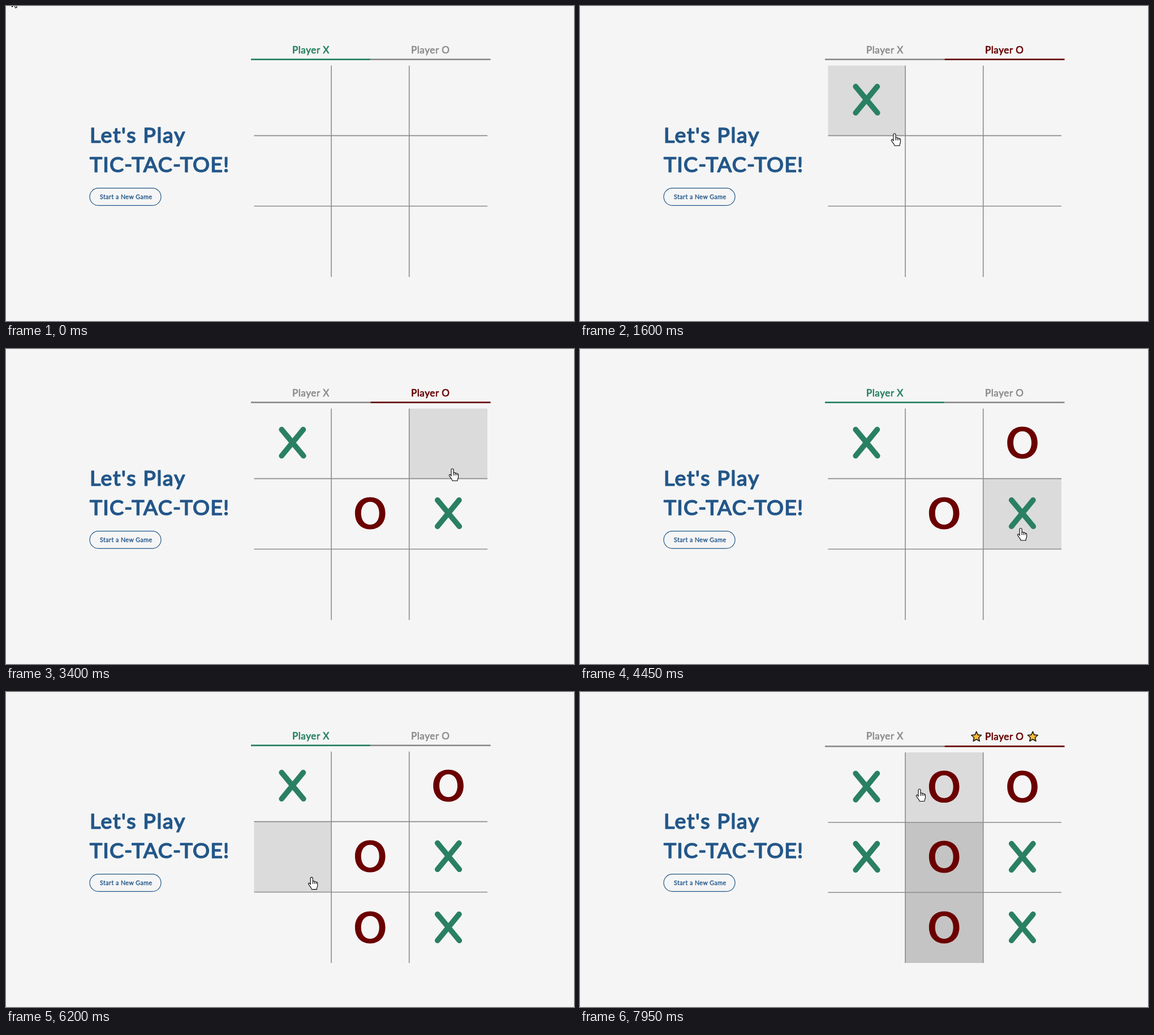
An HTML page for the animation above (8000 ms loop, 1004 by 558 pixels).

```html
<!DOCTYPE html>
<html lang="en">
<head>
<meta charset="utf-8">
<title>Tic-Tac-Toe</title>
<style>
  html, body { margin: 0; width: 100%; height: 100%; overflow: hidden; background: #f5f5f5; }
  svg { display: block; width: 100vw; height: 100vh; }
  /* a rounded stroke softens the letter ends */
  text {
    font-family: Lato, "Open Sans", sans-serif;
    stroke-linejoin: round;
    fill: currentColor;
    stroke: currentColor;
  }
  .blue { color: #235789; }
  .title { font-size: 37.5px; stroke-width: 1.7px; }
  .label { font-size: 10.6px; stroke-width: .4px; letter-spacing: .5px; }
  .player { font-size: 17px; stroke-width: .7px; letter-spacing: .6px; }
  .grid { stroke: #8c8c8c; stroke-width: 1.6; fill: none; }
  .x { stroke: #2a8062; stroke-width: 9.6; stroke-linecap: round; fill: none; }
  .o { fill: #6b0000; fill-rule: evenodd; }
  .star { fill: #fdbb35; stroke: #1c1a17; stroke-width: 1.6; stroke-linejoin: round; }
  .cursor { fill: #fff; stroke: #000; stroke-width: 1.1; stroke-linejoin: round; }
</style>
</head>
<body>
<svg viewBox="0 0 1004 558">
  <rect width="1004" height="558" fill="#f5f5f5"/>
  <g class="blue">
    <text class="title" x="148" y="242" letter-spacing="1.7">Let's Play</text>
    <text class="title" x="148" y="293.7" letter-spacing="1.2">TIC-TAC-TOE!</text>
    <rect x="148" y="322.7" width="126" height="30.6" rx="15.3" fill="none" stroke="currentColor" stroke-width="1.2"/>
    <text class="label" x="166" y="341.6">Start a New Game</text>
  </g>
  <g id="tabX"><text class="player" x="506" y="83.7">Player X</text></g>
  <g id="tabO"><text class="player" x="716" y="83.7">Player O</text></g>
  <g id="stars"></g>
  <g id="cells"></g>
  <path id="grid" class="grid"/>
  <g id="marks"></g>
  <g id="pointer">
    <path id="arrow" class="cursor" d="M0 0V16.5L3.8 13 6.3 18.6 8.8 17.5 6.4 12H11.5Z"/>
    <path id="hand" class="cursor" d="M-2 13V2A2 2 0 0 1 2 2V7.5C2.5 6.3 5 6.5 5 8.2C5.6 7.2 7.8 7.5 8 9.2C8.6 8.4 10.5 8.8 10.5 10.5V15C10.5 17 9 18 9 21.5H0C0 18.5 -3 17 -5.5 12.5C-6.5 10.5 -4.3 9.5 -3.2 11L-2 13ZM2 7.5V12M5 8.2V12M8 9.2V12"/>
  </g>
</svg>
<script>
const LOOP = 8000, STEP = 50, WIN = 7400;
const COLS = [438.5, 575, 712.7, 851];
const ROWS = [105.5, 229.6, 354.5, 480], WON_ROWS = [107, 231, 355, 480];
const MARK_X = [506.5, 643.7, 782];
const MARK_Y = [166, 291, 417], WON_MARK_Y = [167.7, 292, 417];
const WIN_CELLS = [1, 4, 7];
const GREY = '#8c8c8c', GREEN = '#26805f', RED = '#650000';

// time of each click and the cell it fills; X starts
const MOVES = [[1350, 0], [2250, 4], [3150, 5], [4050, 2], [4900, 8], [5700, 7], [6550, 3], [WIN, 1]];

// pointer: time, x, y
const PATH = [
  [0, 10.5, -15], [200, 10.5, -15], [1050, 474, 140], [1200, 493, 170], [1300, 493, 170],
  [1600, 556, 226], [2150, 659, 288], [2350, 659, 288], [2900, 770, 285], [3100, 770, 285],
  [3400, 789, 212], [3900, 785, 168], [4000, 785, 168], [4800, 775, 420], [5000, 775, 420],
  [5400, 658, 429], [5500, 650, 430], [5850, 650, 430], [6350, 510, 300], [6500, 510, 300],
  [6750, 573, 225], [7150, 650, 171], [7850, 650, 171], [7950, 600, 172], [8000, 600, 172]
];

const $ = id => document.getElementById(id);

function add(parent, tag, attrs) {
  const el = document.createElementNS('http://www.w3.org/2000/svg', tag);
  for (const k in attrs) el.setAttribute(k, attrs[k]);
  return parent.appendChild(el);
}

// squarish ellipse, k sets how full the corners are
function oval(rx, ry, k) {
  const a = rx * k, b = ry * k;
  return `M0 ${-ry}C${a} ${-ry} ${rx} ${-b} ${rx} 0S${a} ${ry} 0 ${ry}S${-rx} ${b} ${-rx} 0S${-a} ${-ry} 0 ${-ry}Z`;
}

const X_SHAPE = 'M-19.3 -23.4L19.3 23.2M18.9 -23.4L-19.3 23.2';
const O_SHAPE = oval(26.8, 28.4, .6) + oval(16, 20.2, .6);

function starPoints(cx, cy) {
  return Array.from({ length: 10 }, (_, i) => {
    const r = i % 2 ? 4.3 : 9.4, a = i * Math.PI / 5 - Math.PI / 2;
    return `${cx + r * Math.cos(a)},${cy + r * Math.sin(a)}`;
  }).join(' ');
}

const cells = Array.from({ length: 9 }, () => add($('cells'), 'rect', {}));
const marks = MOVES.map((_, i) => add($('marks'), 'path',
  i % 2 ? { class: 'o', d: O_SHAPE } : { class: 'x', d: X_SHAPE }));
const lineX = add($('tabX'), 'rect', { x: 433, width: 211.5, height: 2.7, fill: 'currentColor' });
const lineO = add($('tabO'), 'rect', { x: 644.5, width: 212, height: 2.7, fill: 'currentColor' });
for (const x of [700.7, 800.3]) add($('stars'), 'polygon', { class: 'star', points: starPoints(x, 79.4) });

function slope(i, axis) {
  const a = PATH[i - 1], p = PATH[i], b = PATH[i + 1];
  const still = (u, v) => u[1] === v[1] && u[2] === v[2];
  if (!a || !b || still(a, p) || still(p, b)) return 0;
  return (b[axis] - a[axis]) / (b[0] - a[0]);
}

function pointerAt(t) {
  let i = 0;
  while (i < PATH.length - 2 && PATH[i + 1][0] <= t) i++;
  const a = PATH[i], b = PATH[i + 1], d = b[0] - a[0], u = (t - a[0]) / d;
  const ease = u * u * (3 - 2 * u);
  return [1, 2].map(n => a[n] + (b[n] - a[n]) * ease
    + d * u * (1 - u) * ((1 - u) * slope(i, n) - u * slope(i + 1, n)));
}

function cellAt(x, y, rows) {
  const find = (v, edges) => edges.findIndex((e, i) => v >= e && v < edges[i + 1]);
  const c = find(x, COLS), r = find(y, rows);
  return c < 0 || r < 0 ? -1 : r * 3 + c;
}

const show = (el, on) => el.setAttribute('visibility', on ? 'visible' : 'hidden');

function draw(t) {
  const won = t >= WIN;
  const rows = won ? WON_ROWS : ROWS, markY = won ? WON_MARK_Y : MARK_Y;
  const [px, py] = pointerAt(t);
  const hover = cellAt(px, py, rows);

  cells.forEach((el, i) => {
    const c = i % 3, r = Math.floor(i / 3);
    el.setAttribute('x', COLS[c]);
    el.setAttribute('y', rows[r]);
    el.setAttribute('width', COLS[c + 1] - COLS[c]);
    el.setAttribute('height', rows[r + 1] - rows[r]);
    const win = won && WIN_CELLS.includes(i);
    el.setAttribute('fill', i === hover ? '#dbdbdb' : win ? '#c4c4c4' : 'none');
  });

  const [top, r1, r2, end] = rows;
  $('grid').setAttribute('d',
    `M${COLS[1]} ${top}V${end}M${COLS[2]} ${top}V${end}M${COLS[0]} ${r1}H${COLS[3]}M${COLS[0]} ${r2}H${COLS[3]}`);

  MOVES.forEach(([at, cell], i) => {
    marks[i].setAttribute('transform', `translate(${MARK_X[cell % 3]} ${markY[Math.floor(cell / 3)]})`);
    show(marks[i], t >= at);
  });

  const played = MOVES.filter(([at]) => t >= at).length;
  const turnO = won || played % 2 === 1;
  $('tabX').style.color = turnO ? GREY : GREEN;
  $('tabO').style.color = turnO ? RED : GREY;
  for (const el of [lineX, lineO]) el.setAttribute('y', won ? 94.9 : 93.3);
  $('tabO').firstElementChild.setAttribute('y', won ? 84.9 : 83.7);
  show($('stars'), won);

  $('pointer').setAttribute('transform', `translate(${px} ${py})`);
  show($('hand'), hover >= 0);
  show($('arrow'), hover < 0);
}

const start = performance.now();
function tick() {
  const t = (performance.now() - start) % LOOP;
  draw(Math.floor(t / STEP) * STEP);
  requestAnimationFrame(tick);
}
tick();
</script>
</body>
</html>
```
